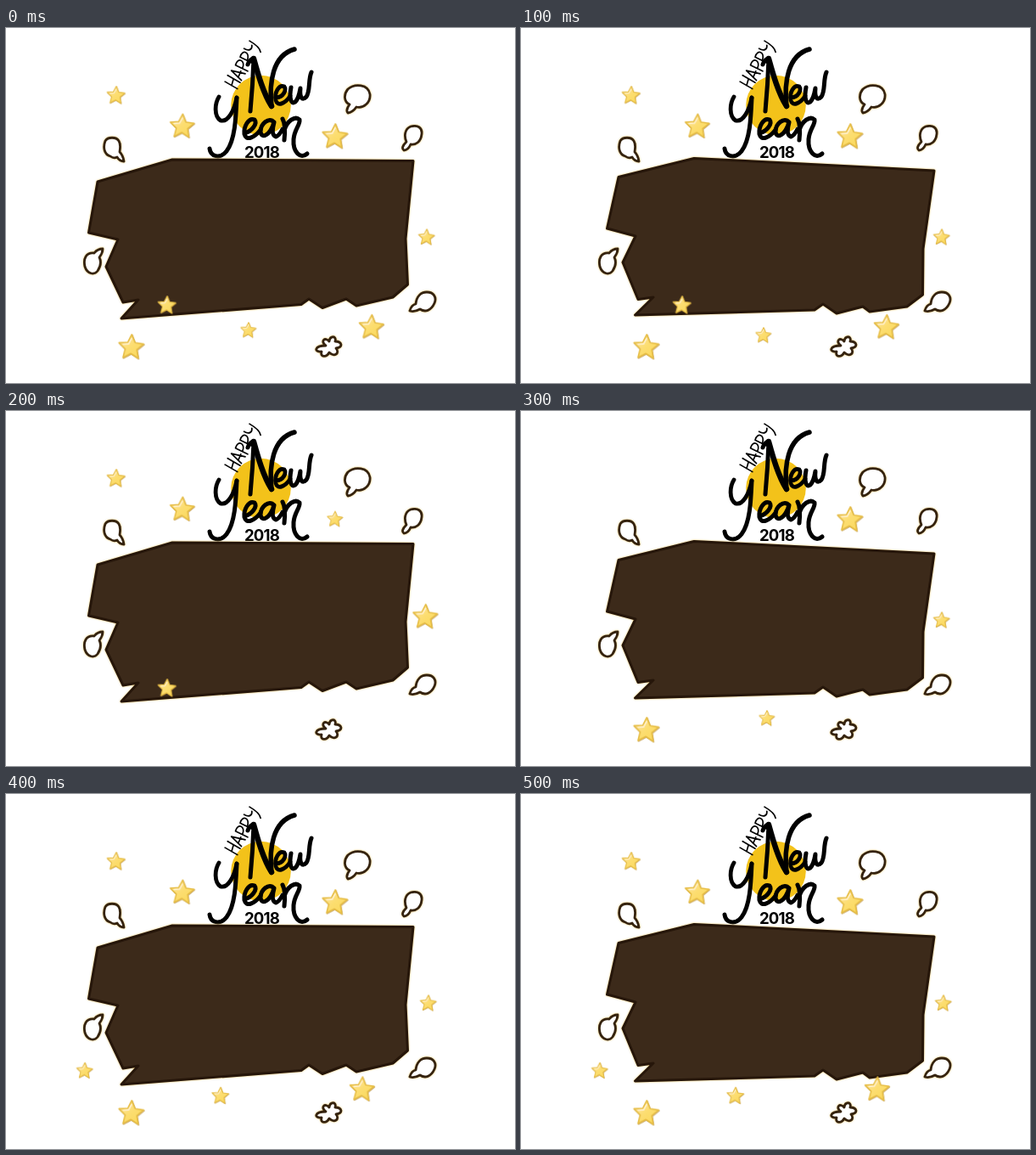
An HTML page that plays this animation: 600x418 px, repeating every 600 ms.

```html
<!DOCTYPE html>
<html lang="en">
<head>
<meta charset="utf-8">
<title>Happy New Year</title>
<style>
  html, body { margin: 0; width: 100%; height: 100%; overflow: hidden; background: #fff; }
  svg { display: block; width: 100vw; height: 100vh; }

  .ink { fill: none; stroke: #000; stroke-linecap: round; stroke-linejoin: round; }
  .year { font: 700 18.6px Inter, sans-serif; text-anchor: middle; letter-spacing: -.8px; }
  .doodles path {
    fill: #fff; stroke: #35230f; stroke-width: 2.8; stroke-linejoin: round;
    filter: drop-shadow(0 0 .8px #e9c566);
  }
  .board {
    fill: #3c2a1a; stroke: #26160a; stroke-width: 3; stroke-linejoin: round;
    filter: drop-shadow(0 0 .8px #e9c566);
    animation: swap .2s step-end infinite;
  }
  .board.tilted { animation-delay: -.1s; }
  @keyframes swap { 0% { visibility: visible } 50%, 100% { visibility: hidden } }

  /* Each star jumps between places and sizes; scale 0 hides it. */
  .stars use { animation: .6s step-end infinite; }
  .stars .a { animation-name: a; }
  .stars .b { animation-name: b; }
  .stars .c { animation-name: c; }
  .stars .d { animation-name: d; }
  .stars .e { animation-name: e; }
  .stars .f { animation-name: f; }
  .stars .g { animation-name: g; }
  .stars .h { animation-name: h; }

  @keyframes a {
    0%, 66.666%, 100% { transform: translate(129.5px, 79.5px) scale(11.5) }
    50% { transform: translate(129.5px, 79.5px) scale(0) }
  }
  @keyframes b {
    0%, 66.666%, 100% { transform: translate(207.5px, 116px) scale(15.5) }
    50% { transform: translate(207.5px, 116px) scale(0) }
  }
  @keyframes c {
    0%, 50%, 100% { transform: translate(387.5px, 128px) scale(16) }
    33.333% { transform: translate(387.5px, 127.5px) scale(10) }
  }
  @keyframes d {
    0%, 50% { transform: translate(495.5px, 246.5px) scale(10.2) }
    33.333% { transform: translate(494px, 242.5px) scale(15.6) }
    66.666%, 100% { transform: translate(497.5px, 246.5px) scale(10.2) }
  }
  @keyframes e {
    0% { transform: translate(189.5px, 326.5px) scale(11.5) }
    50% { transform: translate(189.5px, 326.5px) scale(0) }
    66.666%, 100% { transform: translate(92.5px, 326px) scale(10.2) }
  }
  @keyframes f {
    0%, 50%, 100% { transform: translate(147.5px, 376px) scale(16) }
    33.333% { transform: translate(147.5px, 376px) scale(0) }
  }
  @keyframes g {
    0% { transform: translate(285.5px, 356px) scale(10) }
    16.666% { transform: translate(285.5px, 362px) scale(10) }
    33.333% { transform: translate(285.5px, 362px) scale(0) }
    50% { transform: translate(289.5px, 362px) scale(10) }
    66.666%, 100% { transform: translate(252.5px, 355.5px) scale(10.8) }
  }
  @keyframes h {
    0% { transform: translate(430.5px, 352.5px) scale(15.6) }
    33.333% { transform: translate(430.5px, 352.5px) scale(0) }
    66.666%, 100% { transform: translate(419.5px, 348px) scale(15.6) }
  }
</style>
</head>
<body>
<svg viewBox="0 0 600 418" preserveAspectRatio="none">
  <defs>
    <linearGradient id="gold" x1="0" y1="0" x2="1" y2="1">
      <stop offset=".2" stop-color="#fde295"/>
      <stop offset=".5" stop-color="#fcdd70"/>
      <stop offset="1" stop-color="#fad858"/>
    </linearGradient>
    <path id="points" d="M0-.95 .27-.36 .91-.29 .43.14 .56.78 0 .45-.56.78-.43.14-.91-.29-.27-.36Z"
      stroke-width=".1" stroke-linejoin="round"/>
    <g id="star" transform="rotate(3)">
      <use href="#points" transform="translate(.04 .05)" fill="#b98f3c" stroke="#b98f3c" opacity=".7"/>
      <use href="#points" fill="url(#gold)" stroke="#e6bd45"/>
      <path d="M-.6-.2-.2-.24 0-.64" fill="none" stroke="#fff0cf" stroke-width=".1" stroke-linecap="round"/>
    </g>
  </defs>

  <circle cx="300.500" cy="91" r="35.3" fill="#f3c21a"/>

  <g class="ink">
    <!-- Happy -->
    <g transform="translate(271.500 72) rotate(-60)" stroke-width="1.7">
      <path d="M1-16 1 1M9-17 9 0M1-7 9-9"/>
      <path d="M12 0 16-16 21 0M13-5 21-6"/>
      <path d="M25 1 24-15C34-18 35-7 25-6"/>
      <path d="M36 1 35-15C45-18 46-7 36-6"/>
      <path d="M46-16C46-9 50-7 54-10M57-15C57-7 56 0 52 3"/>
    </g>
    <!-- New -->
    <path d="M285 43Q287 37 292 36Q291 66 288 98" stroke-width="5"/>
    <path d="M292 36C297 54 303 76 313 92" stroke-width="6.500"/>
    <path d="M313 92C310 65 314 32 340 25" stroke-width="5.500"/>
    <path d="M319 82C327 81 331 73 328 69C322 66 316 76 318 85C320 93 329 89 335 80" stroke-width="4.800"/>
    <path d="M336 70C334 80 335 91 341 87Q345 83 347 71C346 82 349 86 354 81C359 74 356 61 360 52" stroke-width="5"/>
    <!-- Year -->
    <path d="M251 81C246 89 245 104 253 109C262 111 269 97 272 82" stroke-width="4.800"/>
    <path d="M272 82C271 106 270 132 260 145C252 155 241 151 240 142" stroke-width="5"/>
    <path d="M281 124C289 122 297 113 293 108C286 105 280 116 281 125C283 133 292 130 300 120" stroke-width="5"/>
    <path d="M316 111C310 104 300 113 300 122C301 131 311 127 316 111Q312 126 318 128Q322 127 326 119" stroke-width="5"/>
    <path d="M326 107Q330 114 328 132" stroke-width="5"/>
    <path d="M328 121C331 109 341 103 346 108C347 114 340 119 339 131C338 146 347 155 355 148" stroke-width="5"/>
  </g>
  <text class="year" x="301.500" y="152.700">2018</text>

  <g class="doodles">
    <path d="M405 90C398 87 398 78 403 72C411 65 427 66 429 78C430 88 421 95 413 93Q409 99 403 100Q400 97 405 90Z"/>
    <path d="M123 151C116 149 114 141 117 133C120 128 130 128 133 133C136 138 134 143 134 146Q138 150 139 157Q134 157 131 152Q127 154 123 151Z"/>
    <path d="M472 134C469 127 470 119 477 116C485 114 491 117 490 125C489 134 483 138 477 137Q474 144 469 144Q465 141 472 134Z"/>
    <path d="M104 265C94 264 91 272 93 281C96 290 104 291 108 286C112 280 112 274 110 270Q114 265 114 260Q108 260 104 265Z"/>
    <path d="M483 325C484 316 489 311 496 311C504 311 508 317 505 324C501 333 494 335 488 331Q481 335 476 333Q478 326 483 325Z"/>
    <path d="M377 374C370 369 376 363 381 369C382 362 390 362 388 369C396 369 398 376 389 377C394 383 387 388 381 382C378 388 370 388 372 381C363 382 363 374 377 374Z"/>
  </g>

  <path class="board" d="M108 181 196 155 480 156.500 471 248 473.500 302 456 317 413 327 401 319 373 329.500 357 319 348 325.500 136 342 156 320 138 323 118 281 132 249 97.500 241Z"/>
  <path class="board tilted" d="M115 175.500 204 153.500 487 168 474 260 473.500 314 455 328 411 334 403 328 372 336 356 325 346 332 134.500 338 156 317 138 319.500 120 276 135 245 101.500 236Z"/>

  <g class="stars">
    <use href="#star" class="a"/>
    <use href="#star" class="b"/>
    <use href="#star" class="c"/>
    <use href="#star" class="d"/>
    <use href="#star" class="e"/>
    <use href="#star" class="f"/>
    <use href="#star" class="g"/>
    <use href="#star" class="h"/>
  </g>
</svg>
</body>
</html>
```
